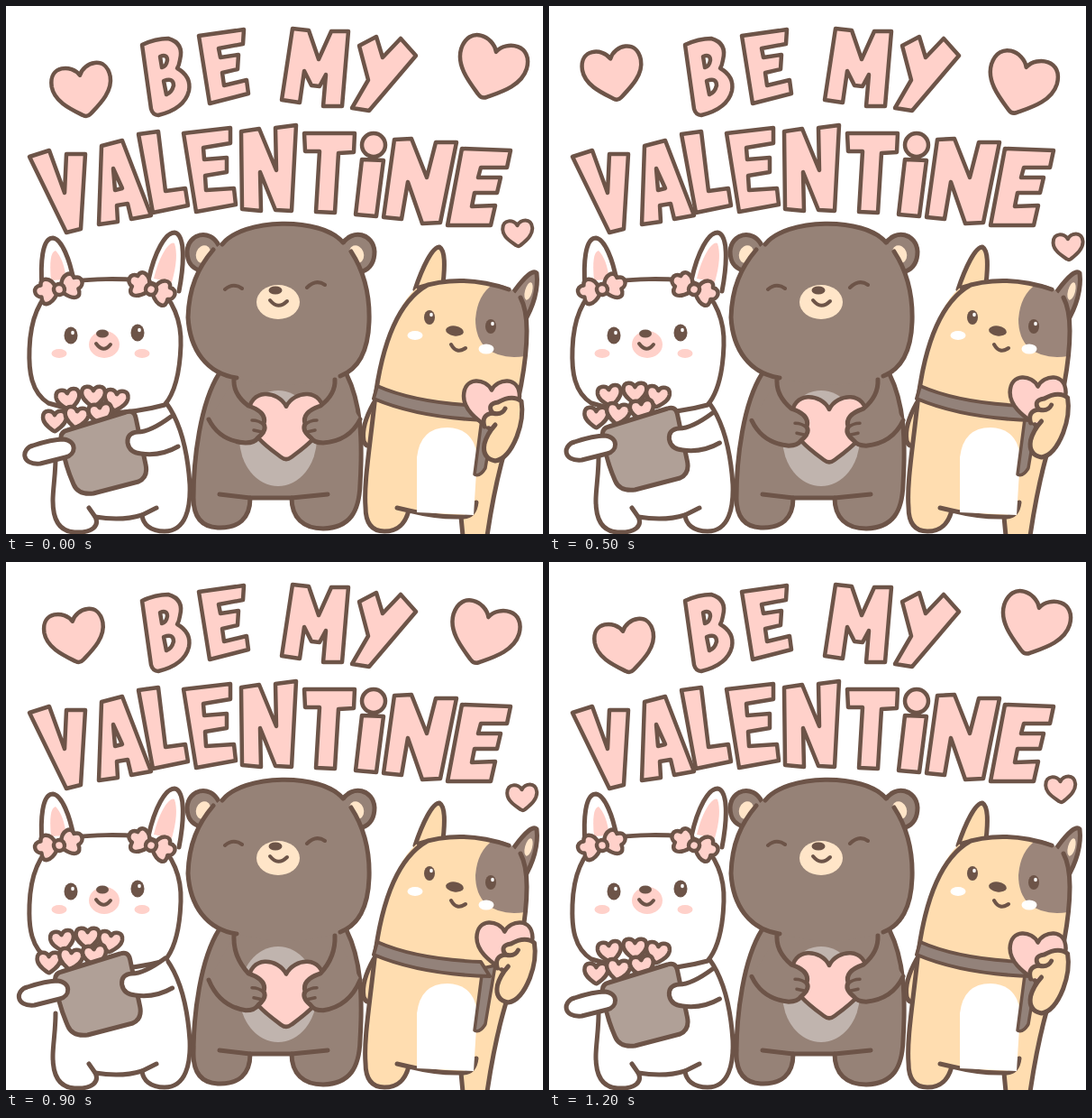
Animation of 596 by 585 pixels, one loop 1.3 s. Source, as an HTML page:

```html
<!DOCTYPE html>
<html lang="en">
<head>
<meta charset="utf-8">
<title>Be my valentine</title>
<style>
  html, body { margin: 0; width: 100%; height: 100%; overflow: hidden; background: #fff; }
  svg { display: block; width: 596px; height: 585px; }
</style>
</head>
<body>
<svg id="stage" viewBox="0 0 596 585" fill="none" stroke="#6d5448" stroke-width="5"
     stroke-linecap="round" stroke-linejoin="round" role="img" aria-label="Be my valentine"></svg>
<script>
const PINK = '#ffd1ca', BROWN = '#968277', INK = '#6d5448', TAN = '#ffddb0',
      CREAM = '#ffe5c8', BAG = '#b0a097', STRAP = '#93827a', WHITE = '#fff';

const path = (d, fill = 'none', extra = '') => `<path d="${d}" fill="${fill}" ${extra}/>`;
const flat = (d, fill) => path(d, fill, 'stroke="none"');
const smile = d => path(d, 'none', 'stroke-width="4"');
const oval = (x, y, rx, ry, fill, turn = 0) =>
  `<ellipse cx="${x}" cy="${y}" rx="${rx}" ry="${ry}" fill="${fill}" stroke="none" transform="rotate(${turn} ${x} ${y})"/>`;
const group = (x, y, body) => `<g transform="translate(${x} ${y})">${body}</g>`;
const eye = (x, y, rx, ry) => oval(x, y, rx, ry, INK) + oval(x + 2, y - 3, 1.8, 2.2, WHITE);

function heart(x, y, size, turn = 0, line = 4.5) {
  const d = 'M0-.53C-.2-.95-.98-1.05-1-.32C-1 .2-.48.55-.13.81Q0 .91.13.81C.48.55 1 .2 1-.32C.98-1.05.2-.95 0-.53Z';
  return `<path d="${d}" fill="${PINK}" stroke-width="${line / size}" transform="translate(${x} ${y}) rotate(${turn}) scale(${size})"/>`;
}

function bow(x, y, turn) {
  const half = path('M3-3C6-16 18-18 19-9C29-10 29 2 21 4C23 15 13 16 3 4Z', PINK);
  return `<g transform="translate(${x} ${y}) rotate(${turn})" stroke-width="4.5">${half}
    <g transform="scale(-1 1)">${half}</g><circle r="6" fill="${PINK}"/></g>`;
}

const letters = [
  'M151 43Q166 36 180 36Q198 41 193 60Q192 66 190 69Q206 78 203 94Q198 114 169 121Q163 121 161 114ZM171 56Q179 53 179 60Q178 67 173 68ZM175 83Q186 79 186 88Q184 96 178 98Z',
  'M214 33L264 26L263 42L236 47L238 57L258 54L257 70L240 74L242 88L267 82L269 97L226 108Z',
  'M318 25L336 27L347 59L361 28L380 28L373 111L352 111L355 76L348 89L339 88L331 72L326 107L306 104Z',
  'M392 44L411 34L418 57L438 36L455 55L403 116L384 113L402 82Z',
  'M26 167L48 160L65 207L67 164L88 164L83 247L67 251Z',
  'M106 155L129 149L161 232L139 236L135 219L123 221L124 239L103 242ZM119 180L129 202L121 204Z',
  'M147 142L169 139L177 205L199 202L202 221L163 229Z',
  'M197 141L249 135L249 152L219 157L220 170L245 168L245 184L221 188L222 204L253 202L255 220L211 228Z',
  'M261 139L281 136L300 182L299 135L322 132L317 227L299 226L282 184L283 227L262 225Z',
  'M331 141L387 141L386 162L369 163L365 229L344 228L348 161L332 161Z',
  'M395 154a13 13 0 1 0 26 0a13 13 0 1 0-26 0ZM395 170L419 171L411 233L388 231Z',
  'M431 148L450 147L467 190L477 151L500 151L482 240L462 241L446 195L439 236L419 234Z',
  'M506 158L560 160L556 179L527 179L524 190L549 190L545 207L520 207L517 222L543 221L538 243L490 243Z'
].map(d => path(d, PINK, 'fill-rule="evenodd" stroke-width="4.5"')).join('');

const rabbit =
  flat('M60 440L53 540L100 566L194 550L178 440Z', WHITE) +
  path('M55 500C55 520 52 535 52 548C52 568 58 582 76 583C96 584 104 576 99 566Q128 571 151 564C152 574 160 582 176 582C200 582 205 555 204 530Q200 470 178 440', WHITE) +
  path('M92 556L99 566M151 564L167 556') +
  path('M40 312C38 285 40 257 52 257C62 258 71 282 75 304', WHITE) +
  flat('M50 304Q47 273 55 271Q64 280 67 303Z', '#ffcfc8') +
  path('M158 304C165 272 177 251 187 251C199 253 198 285 192 316', WHITE) +
  flat('M164 302C170 276 182 259 187 263Q192 278 184 306Z', '#ffcfc8') +
  path('M176 442Q110 460 47 440C28 428 25 405 26 380C27 350 36 324 56 310C80 301 142 300 164 308C186 324 195 350 194 376C193 405 188 428 176 442Z', WHITE) +
  bow(59, 314, -13) + bow(161, 314, 20) +
  eye(72, 365, 7.5, 9.5) + eye(146, 362, 7.5, 9.5) +
  oval(59, 385, 8.5, 5, PINK) + oval(151, 385, 8.5, 5, PINK) +
  oval(109, 375, 17, 15, PINK) + oval(107, 363, 7, 4.5, INK) +
  smile('M100 374Q108 385 116 375');

const bear =
  path('M236 408C216 440 208 500 208 545C208 565 216 577 235 578C258 579 271 568 271 545H317C317 567 330 579 352 579C382 578 392 560 393 530C396 480 394 440 378 408', BROWN) +
  path('M237 541L271 545M317 545L357 541') +
  oval(302, 479, 43, 53, '#c0b4ae') +
  path('M236 265C226 246 202 252 201 272C201 287 209 291 215 293', BROWN) +
  path('M373 264C384 246 408 252 409 272C409 287 401 292 396 294', BROWN) +
  oval(219, 275, 8, 10, CREAM, 20) + oval(389, 275, 8, 10, CREAM, -20) +
  flat('M252 411C222 407 204 380 202 345C203 305 216 282 240 262C262 238 350 234 374 262C396 285 404 315 403 350C402 380 392 402 376 409Q315 430 252 411Z', BROWN) +
  path('M256 412C222 407 204 380 202 345C203 312 213 290 230 270M240 264C262 235 350 233 374 262M383 272C398 295 404 322 403 350C402 380 392 402 371 410') +
  smile('M243 314Q252 306 262 313M334 312Q344 302 354 309') +
  oval(302, 328, 24, 19, CREAM) + oval(299, 315, 7.5, 4.5, INK) +
  smile('M293 326Q302 337 312 327');

const dog =
  path('M408 440Q394 465 397 482Q400 490 406 486', TAN) +
  path('M454 314C462 290 473 267 481 267C488 271 487 290 485 308', TAN) +
  path('M564 316Q583 290 589 296Q592 322 574 352', '#9b857a') +
  oval(580, 316, 4, 10, CREAM, 15) +
  flat('M460 309C430 330 415 390 409 440C403 495 397 530 399 555C399 575 408 582 420 582C438 582 444 570 447 559Q480 567 505 566L508 590H534Q536 545 553 495C570 440 582 390 578 350Q572 325 556 311Q500 296 460 309Z', TAN) +
  flat('M541 308Q553 308 562 315Q578 332 578 360L576 388Q549 392 533 379Q521 368 521 347Q523 320 541 308Z', '#9b857a') +
  path('M468 309C430 330 415 390 409 440C403 495 397 530 399 555C399 575 408 582 420 582C438 582 444 570 447 559Q480 567 505 566Q520 567 522 550M458 312Q505 296 558 314M571 323Q578 336 578 360C578 400 565 455 553 495C543 530 538 560 534 587M505 566L507 587M434 556L447 559') +
  flat('M456 561V500Q460 467 490 467Q520 468 523 500L519 564Z', WHITE) +
  path('M529 450L543 447L532 512Q526 522 520 519Z', STRAP, 'stroke-width="3.5"') +
  path('M412 421Q455 440 527 443L537 459Q460 457 408 435Z', STRAP, 'stroke-width="4"') +
  eye(470, 345, 6, 8) + eye(538, 355, 6, 8) +
  oval(454, 365, 8.5, 5, WHITE) + oval(533, 380, 8.5, 5.5, WHITE) +
  oval(498, 360, 10, 5.5, INK, 8) +
  smile('M494 375Q500 386 510 379');

const bouquet =
  [[69, 436], [97, 433], [122, 437], [105, 452], [54, 460], [78, 456]]
    .map(([x, y], i) => heart(x, y, 13, i % 3 * 8 - 8)).join('') +
  path('M61 480Q60 472 68 470L133 450Q142 447 144 456L155 508Q158 522 147 527L97 540Q80 542 75 530Q64 505 61 480Z', BAG) +
  path('M30 487C45 482 57 480 64 480C79 482 78 497 66 500L38 507C16 509 17 490 30 487Z', WHITE) +
  flat('M183 455Q160 472 146 472Q134 473 135 484Q137 495 150 496Q172 499 191 488Z', WHITE) +
  path('M183 455Q160 472 146 472Q134 473 135 484Q137 495 150 496Q172 499 191 488');

const dogHand =
  heart(539, 442, 31) +
  path('M531 466Q527 453 540 451Q533 441 546 439Q562 430 572 438Q575 456 567 477Q557 502 543 504Q528 501 531 485Q534 474 543 464', TAN) +
  path('M540 451Q550 454 554 446');

// One bear arm; shoulder ends stay put while the paw follows y.
function bearArm(y) {
  const paw = `M253 414Q252 ${430 + y * .6} 269 ${443 + y}Q290 ${450 + y} 286 ${463 + y}Q290 ${470 + y} 280 ${478 + y}Q276 ${484 + y} 266 ${484 + y}Q237 ${482 + y * .8} 225 ${458 + y * .4}`;
  return flat(paw + 'Z', BROWN) + path(paw) +
    path(`M273 ${459 + y}Q281 ${459 + y} 286 ${464 + y}M275 ${470 + y}L284 ${472 + y}`, 'none', 'stroke-width="3.5"');
}

const stage = document.getElementById('stage');
stage.innerHTML = letters + rabbit + bear + dog + '<g id="live"></g>';
const live = document.getElementById('live');

const STEPS = 13;
const gap = (k, peak) => Math.min(Math.abs(k - peak), STEPS - Math.abs(k - peak));

function draw(k) {
  const drift = 1 - gap(k, 6) / 6;
  const sway = 8 - 4 * gap(k, 2);
  const lift = -.8 * sway;
  live.innerHTML =
    heart(85 - 16.5 * drift, 94 - 22 * drift, 33, -10) +
    heart(538 - 17 * drift, 70 + 20.5 * drift, 38, 17) +
    heart(568 + 10 * drift, 252 + 18 * drift, 16.5, -3, 4) +
    group(.4 * sway, sway, bouquet) +
    heart(311, 466 + lift, 42) +
    bearArm(lift) + `<g transform="translate(618 0) scale(-1 1)">${bearArm(lift)}</g>` +
    group(-.9 * sway, sway, dogHand);
}

let shown = -1;
function tick() {
  const k = Math.floor(performance.now() / 100) % STEPS;
  if (k !== shown) draw(shown = k);
  requestAnimationFrame(tick);
}
tick();
</script>
</body>
</html>
```
